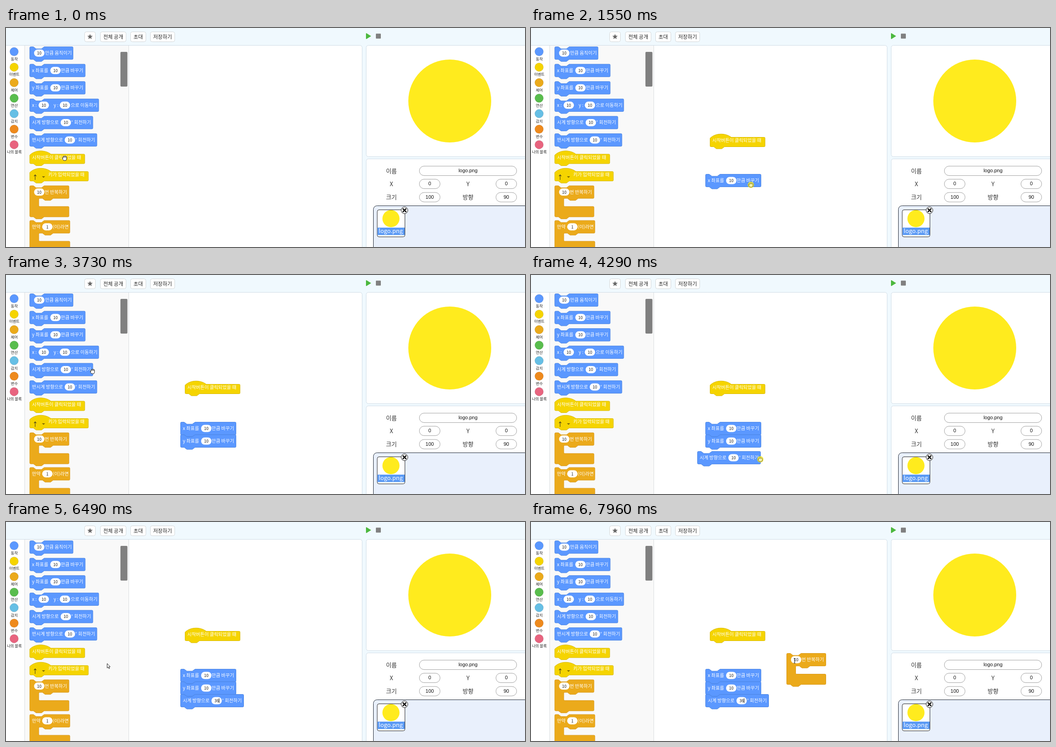
Write an HTML page with a canvas that moves like this. It is 1152 px wide and 486 px high and loops after 8000 ms.

```html
<!DOCTYPE html>
<html lang="ko">
<head>
<meta charset="utf-8">
<title>Block coding</title>
<style>
html, body { margin: 0; width: 100%; height: 100%; overflow: hidden; background: #f0f9fe; }
canvas { display: block; }
</style>
</head>
<body>
<canvas id="stage" width="1152" height="486"></canvas>
<script>
const ctx = document.getElementById('stage').getContext('2d');
const LOOP = 8000, STEP = 78, START = 146;
const KOREAN = '"Noto Sans CJK KR", "Noto Sans KR", "Noto Sans CJK", sans-serif';
const LATIN = '"Liberation Sans", Arial, sans-serif';
const BLUE = ['#5b98ff', '#4a84e2'], YELLOW = ['#f5d400', '#d8b900'], ORANGE = ['#ebaa1b', '#d9991a'];

// Items are [text, dx]; a leading # marks a number field centred at dx.
const BLOCKS = {
  move:   { row: 0,  w: 96,  color: BLUE, items: [['#10', 21], ['만큼 움직이기', 34]] },
  addX:   { row: 1,  w: 123, color: BLUE, items: [['x 좌표를', 5], ['#10', 57], ['만큼 바꾸기', 69]] },
  addY:   { row: 2,  w: 123, color: BLUE, items: [['y 좌표를', 5], ['#10', 57], ['만큼 바꾸기', 69]] },
  goTo:   { row: 3,  w: 153, color: BLUE, items: [['x :', 5], ['#10', 31], ['y :', 53], ['#10', 78], ['으로 이동하기', 91]] },
  turn:   { row: 4,  w: 140, color: BLUE, items: [['시계 방향으로', 5], ['#10', 80], ['° 회전하기', 92]] },
  turnCc: { row: 5,  w: 149, color: BLUE, items: [['반시계 방향으로', 5], ['#10', 89], ['° 회전하기', 101]] },
  start:  { row: 6,  w: 122, color: YELLOW, hat: true, items: [['시작버튼이 클릭되었을 때', 5]] },
  key:    { row: 7,  w: 130, color: YELLOW, hat: true, menu: true, items: [['키가 입력되었을 때', 41]] },
  repeat: { row: 8,  w: 87,  color: ORANGE, mouth: true, items: [['#10', 21], ['번 반복하기', 33]] },
  when:   { row: 10, w: 89,  color: ORANGE, mouth: true, items: [['만약', 5], ['#1', 39], ['(이)라면', 51]] }
};
const PALETTE_X = 52.3, PALETTE_Y = 41.2, ROW = 38.55;

// Pointer path: [step, x, y, look from here on]
const PATH = [
  [-2, 130, 289, 'hand'], [0, 131, 289], [6, 475, 252], [10, 153, 105], [11, 154, 105],
  [17, 488, 346], [18, 488, 348], [19, 488, 350], [25, 160, 135], [30, 535, 408],
  [32, 515, 391], [33, 502, 388], [35, 502, 388], [45, 192, 214], [47, 192, 214],
  [50, 534, 420], [53, 509, 409], [55, 522, 402], [57, 522, 402], [61, 469, 398, 'beam'],
  [63, 467, 397], [64, 468, 405, 'arrow'], [67, 484, 460], [69, 484, 460], [70, 485, 461],
  [71, 485, 461], [81, 224, 314], [82, 223, 314, 'hand'], [85, 180, 281], [88, 121, 367],
  [91, 121, 367], [92, 270, 344], [93, 488, 322], [97, 635, 308], [99, 588, 308, 'beam'], [100, 585, 308]
];
const DRAGS = [
  { block: 'start',  from: 0,  to: 6,  grip: [78, 17],  end: [397, 235] },
  { block: 'addX',   from: 11, to: 19, grip: [101, 24], end: [387, 326] },
  { block: 'addY',   from: 25, to: 34, grip: [108, 16], end: [387, 354] },
  { block: 'turn',   from: 47, to: 55, grip: [140, 18], end: [387, 382] },
  { block: 'repeat', from: 90, to: 97, grip: [68, 17],  end: [567, 291] }
];

function text(str, x, y, size, color = '#222', align = 'left', family = KOREAN, weight = 400) {
  ctx.font = `${weight} ${size}px ${family}`;
  ctx.fillStyle = color;
  ctx.textAlign = align;
  ctx.textBaseline = 'middle';
  ctx.fillText(str, x, y);
}

function box(x, y, w, h, r, fill, stroke) {
  ctx.beginPath();
  ctx.roundRect(x, y, w, h, r);
  paint(fill, stroke);
}

function disc(x, y, r, fill, stroke) {
  ctx.beginPath();
  ctx.arc(x, y, r, 0, Math.PI * 2);
  paint(fill, stroke);
}

function poly(points, fill, stroke) {
  ctx.beginPath();
  points.forEach(([x, y]) => ctx.lineTo(x, y));
  ctx.closePath();
  paint(fill, stroke);
}

function paint(fill, stroke, shape) {
  const args = shape ? [shape] : [];
  ctx.lineWidth = 1;
  if (fill) { ctx.fillStyle = fill; ctx.fill(...args); }
  if (stroke) { ctx.strokeStyle = stroke; ctx.stroke(...args); }
}

function blockShape({ w, hat, mouth }) {
  const bottom = mouth ? 69 : 28;
  const tab = 'l-6 4.5h-12l-6 -4.5';
  let d = hat
    ? `M0 9C12 -3 34 -3 47 7H${w - 2}q2 0 2 2`
    : `M0 2q0 -2 2 -2H8l6 4.5h12l6 -4.5H${w - 2}q2 0 2 2`;
  if (mouth) d += `V26q0 2 -2 2H52${tab}H22q-2 0 -2 2V44q0 2 2 2H${w - 2}q2 0 2 2`;
  d += `V${bottom - 2}q0 2 -2 2H32${tab}H2q-2 0 -2 -2Z`;
  return new Path2D(d);
}
for (const block of Object.values(BLOCKS)) block.shape = blockShape(block);

function drawField(x, y, value, edit) {
  box(x - 11.5, y - 8, 23, 16, 8, '#fff');
  if (edit === 'selected') {
    ctx.fillStyle = '#3a7fd0';
    ctx.fillRect(x - 6, y - 5.5, 12, 11);
  }
  text(value, x, y, 9.2, edit === 'selected' ? '#fff' : '#222', 'center', KOREAN, 500);
  if (edit === 'typing') {
    const half = ctx.measureText(value).width / 2;
    ctx.fillStyle = '#000';
    ctx.fillRect(Math.round(x + half), y - 5, 1, 10);
  }
}

function drawBlock(name, x, y, value, edit) {
  const block = BLOCKS[name];
  ctx.save();
  ctx.translate(x + 0.5, y + 0.5);
  paint(...block.color, block.shape);
  for (const [item, dx] of block.items) {
    if (item[0] === '#') drawField(dx, 14, value || item.slice(1), edit);
    else text(item, dx, block.hat ? 14 : 13.5, 10.3, '#fff', 'left', KOREAN, 500);
  }
  if (block.menu) {
    text('↑', 12, 19.5, 13, '#222', 'center');
    poly([[27, 17.5], [34, 17.5], [30.5, 21]], '#7d6a00');
  }
  ctx.restore();
}

function drawHeader() {
  for (const [x, w, label] of [[174, 25], [209, 58, '전체 공개'], [276, 35, '초대'], [320, 55, '저장하기']]) {
    box(x + 0.5, 8.5, w - 1, 22, 4, '#fff', '#d3d6d8');
    if (label) text(label, x + w / 2, 19.5, 11.3, '#222', 'center');
  }
  const star = Array.from({ length: 10 }, (_, i) => {
    const a = i * Math.PI / 5 - Math.PI / 2, r = i % 2 ? 2.8 : 6.3;
    return [186.5 + r * Math.cos(a), 19.5 + r * Math.sin(a)];
  });
  poly(star, '#686868');
  poly([[799, 12], [800, 11.5], [810.5, 18], [800, 24.5], [799, 24]], '#4cb83e');
  box(821, 12.5, 11, 11, 1, '#808080');
}

function drawCategories() {
  const list = [['동작', '#5b98ff'], ['이벤트', '#f5d400'], ['제어', '#ebaa1b'], ['연산', '#59bd4d'],
    ['감지', '#66bfe5'], ['변수', '#ee8a1d'], ['나의 블록', '#e8647f']];
  list.forEach(([label, color], i) => {
    const y = 52.5 + i * 34.4;
    disc(18, y, 9.5, color, 'rgba(0,0,0,.12)');
    text(label, 18.5, y + 16.3, 8.4, '#222', 'center');
  });
}

function drawProperties() {
  const field = (label, labelX, x, y, w, value) => {
    text(label, labelX, y, 13, '#333', 'center');
    box(x + 0.5, y - 10.5, w, 21, 10.5, '#fff', '#a0a0a0');
    text(value, x + w / 2 + 0.5, y, 11, '#111', 'center', LATIN);
  };
  field('이름', 855.5, 917, 317, 216, 'logo.png');
  field('X', 855.5, 917, 346, 46, '0');
  field('Y', 1025.5, 1087, 346, 46, '0');
  field('크기', 855.5, 917, 375.5, 46, '100');
  field('방향', 1025.5, 1087, 375.5, 46, '90');
}

function drawSpriteCard() {
  box(815.5, 394.5, 345, 110, 8, '#e9f0fc', '#1d2633');
  box(824, 403.5, 61.5, 60, 4, '#fff', '#222');
  disc(854.5, 423, 19, '#ffeb1e');
  ctx.fillStyle = '#5b9af5';
  ctx.fillRect(824.5, 443, 60.5, 16.5);
  text('logo.png', 854, 450.5, 13, '#fff', 'center', KOREAN, 500);
  disc(884.5, 404.5, 7.5, '#fff', '#111');
  ctx.beginPath();
  for (const s of [-1, 1]) {
    ctx.moveTo(880.5, 404.5 - 4 * s);
    ctx.lineTo(888.5, 404.5 + 4 * s);
  }
  ctx.lineWidth = 2.6;
  ctx.strokeStyle = '#111';
  ctx.stroke();
}

function drawLayout() {
  const line = '#cfdce6';
  ctx.fillStyle = '#f0f9fe';
  ctx.fillRect(0, 0, 1152, 486);
  drawHeader();
  box(-9.5, 38.5, 800, 470, 5, '#fff', line);
  ctx.fillStyle = '#f9f9f9';
  ctx.fillRect(42, 39, 230, 447);
  ctx.fillStyle = '#d9dde0';
  ctx.fillRect(41, 39, 1, 447);
  ctx.fillRect(272, 39, 1, 447);
  box(799.5, 38.5, 380, 247, 5, '#fff', line);
  box(799.5, 290.5, 380, 220, 5, '#fff', line);
  drawCategories();
  for (const name in BLOCKS) drawBlock(name, PALETTE_X, PALETTE_Y + BLOCKS[name].row * ROW);
  box(254, 53, 15.5, 77, 2, '#808080');
  disc(985, 162, 92, '#ffeb1e');
  drawProperties();
  drawSpriteCard();
}

function pointerAt(step) {
  let i = 0;
  while (i < PATH.length - 2 && PATH[i + 1][0] <= step) i++;
  const [k0, x0, y0] = PATH[i], [k1, x1, y1] = PATH[i + 1];
  const u = Math.min(1, (step - k0) / (k1 - k0));
  const ease = u * u * (3 - 2 * u);
  const look = PATH.filter(p => p[3] && p[0] <= step).pop()[3];
  return { x: Math.round(x0 + (x1 - x0) * ease), y: Math.round(y0 + (y1 - y0) * ease), look };
}

function drawPointer({ x, y, look }, pressed) {
  ctx.save();
  ctx.translate(x, y);
  if (look === 'arrow') {
    poly([[0.5, 0], [0.5, 10], [2.8, 8], [4.5, 11.5], [6, 10.8], [4.4, 7.5], [7.3, 7.2]], '#fff', '#222');
  } else if (look === 'beam') {
    ctx.fillStyle = '#222';
    ctx.fillRect(-0.5, -5, 1, 10);
    ctx.fillRect(-2, -5.5, 4, 1);
    ctx.fillRect(-2, 4.5, 4, 1);
  } else {
    if (pressed) disc(0, 0, 7, 'rgba(238,225,35,.8)');
    const edge = pressed ? '#8b8420' : '#222', fill = pressed ? '#f6f2a8' : '#fff';
    const top = pressed ? -3 : -5;
    for (const i of [0, 1, 2, 3]) box(-3.5 + i * 2, top + (i % 3 ? 0 : 1), 2, 6, 1, fill, edge);
    poly([[-5, -0.5], [-3.5, 0], [4.5, -1], [4.5, 2], [3, 5], [-2, 5], [-4, 2.5]], fill, edge);
    ctx.fillStyle = fill;
    ctx.fillRect(-3, -1.5, 7, 3);
  }
  ctx.restore();
}

function angleEdit(step) {
  if (step < 62) return [];
  if (step < 70) return ['10', 'selected'];
  return [step < 72 ? '3' : '36', 'typing'];
}

function draw(time) {
  const step = Math.floor((time - START) / STEP);
  const pointer = pointerAt(step);
  let pressed = false;
  drawLayout();
  for (const { block, from, to, grip, end } of DRAGS) {
    if (step < from) continue;
    const held = step < to;
    const [x, y] = held ? [pointer.x - grip[0], pointer.y - grip[1]] : end;
    pressed = pressed || held;
    drawBlock(block, x, y, ...(block === 'turn' ? angleEdit(step) : []));
  }
  drawPointer(pointer, pressed);
}

function tick() {
  draw(performance.now() % LOOP);
  requestAnimationFrame(tick);
}
tick();
</script>
</body>
</html>
```
